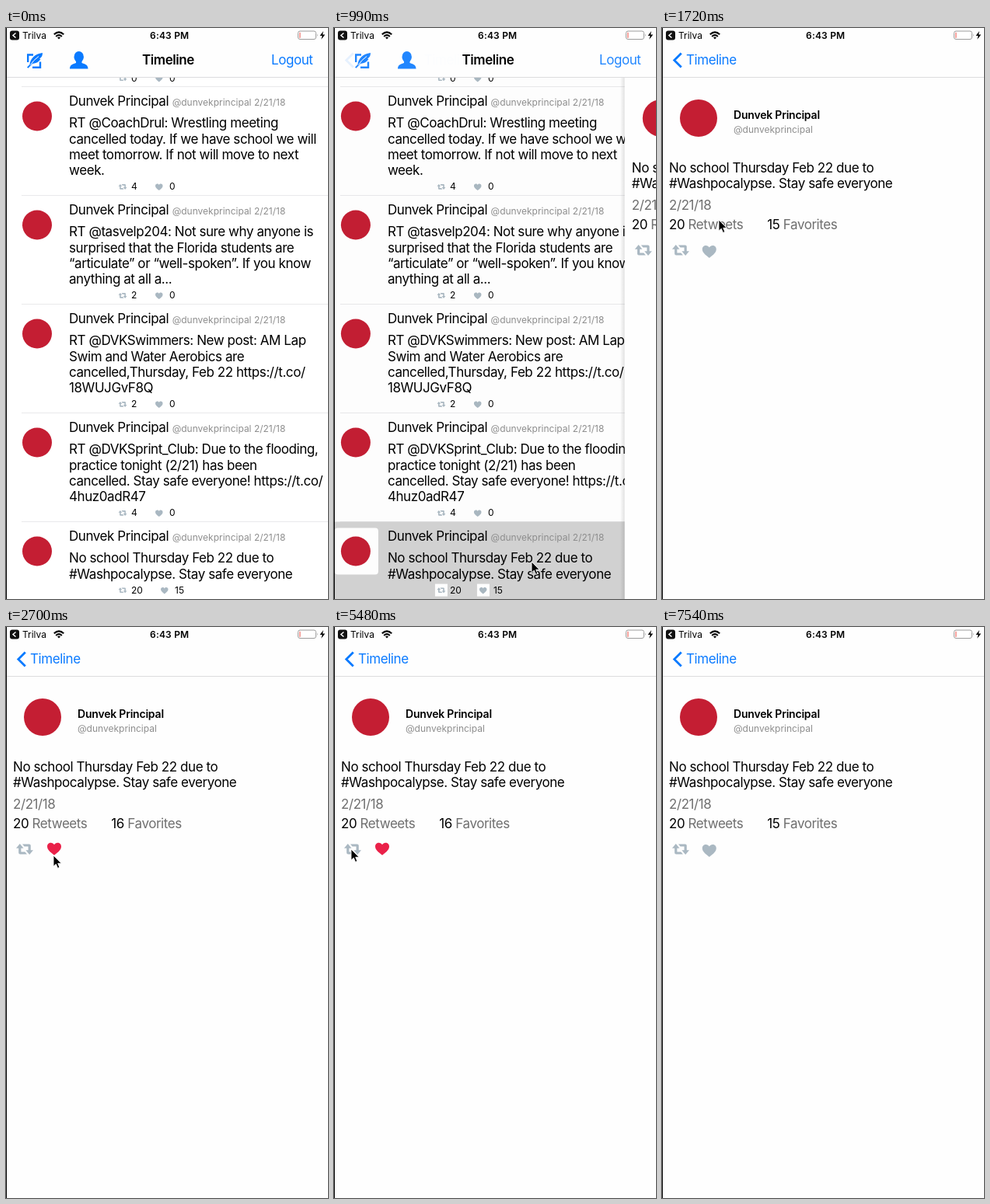
Animation of 414x735 px, one loop 7.64 s. Source, as an HTML page:

```html
<!DOCTYPE html>
<html lang="en">
<head>
<meta charset="utf-8">
<title>Timeline</title>
<style>
  html, body { margin: 0; width: 100%; height: 100%; overflow: hidden; background: #fff; }
  svg { display: block; width: 414px; height: 735px; }
  text { font: 400 17px Inter, sans-serif; letter-spacing: -.43px; font-feature-settings: "calt" 0; }
  .small { font-size: 12px; letter-spacing: 0; }
  .semi { font-weight: 600; }
  .name { font-size: 14px; font-weight: 600; letter-spacing: -.2px; }
  .clock { font-size: 12px; font-weight: 600; letter-spacing: .2px; }
  .muted { fill: #8e8e8e; }
  .gray { fill: #6f6f6f; }
  .blue { fill: #0a7aff; }
  .icon { fill: #aab8c2; }
</style>
</head>
<body>
<svg id="stage" viewBox="0 0 414 735" xmlns="http://www.w3.org/2000/svg"></svg>
<script>
const LOOP = 7640, WIDTH = 414;
const BLUE = '#0a7aff', BADGE = '#c41e33';
const NAME = 'Dunvek Principal', HANDLE = '@dunvekprincipal', DATE = '2/21/18';
const NEWS = ['No school Thursday Feb 22 due to', '#Washpocalypse. Stay safe everyone'];

const POSTS = [
  { lines: ['RT @CoachDrul: Wrestling meeting', 'cancelled today. If we have school we will',
            'meet tomorrow. If not will move to next', 'week.'], shares: 4, likes: 0 },
  { lines: ['RT @tasvelp204: Not sure why anyone is', 'surprised that the Florida students are',
            '“articulate” or “well-spoken”. If you know', 'anything at all a...'], shares: 2, likes: 0 },
  { lines: ['RT @DVKSwimmers: New post: AM Lap', 'Swim and Water Aerobics are',
            'cancelled,Thursday, Feb 22 https://t.co/', '18WUJGvF8Q'], shares: 2, likes: 0 },
  { lines: ['RT @DVKSprint_Club: Due to the flooding,', 'practice tonight (2/21) has been',
            'cancelled. Stay safe everyone! https://t.co/', '4huz0adR47'], shares: 4, likes: 0 },
  { lines: NEWS, shares: 20, likes: 15 }
];

// Pointer stops: time, x, y
const STOPS = [
  [150, 363, 580], [670, 254, 687],
  [1270, 254, 687], [1510, 75, 239],
  [1719, 75, 239], [1720, 73, 247], [1870, 46, 297],
  [2080, 46, 297], [2180, 60, 271], [2260, 66, 283], [2340, 61, 294],
  [3060, 61, 294], [3420, 22, 286],
  [5720, 22, 286], [6050, 60, 284],
  [6560, 60, 284], [6920, 348, 736]
];

const text = (x, y, s, cls = '', extra = '') => `<text x="${x}" y="${y}" class="${cls}" ${extra}>${s}</text>`;
const rect = (x, y, w, h, fill, extra = '') =>
  `<rect x="${x}" y="${y}" width="${w}" height="${h}" fill="${fill}" ${extra}/>`;
const place = (id, x, y, k = 1, extra = '') =>
  `<use href="#${id}" transform="translate(${x} ${y}) scale(${k})" ${extra}/>`;

function counts(y, shares, likes) {
  const heartX = shares > 9 ? 199 : 192;
  return place('share', 144.5, y - 7.3, .5, 'class="icon"') + text(161, y, shares, 'small') +
    place('heart', heartX, y - 7.6, .53, 'class="icon"') + text(heartX + 18, y, likes, 'small');
}

function post({ lines, shares, likes }, i) {
  const y = i * 140 + 75.5, end = y + 51.5 + lines.length * 20.3;
  const chosen = i === 4
    ? `<g id="chosen">${rect(0, y, WIDTH, 110, '#d3d3d3')}${rect(13, y + 8, 56, 60, '#fff', 'rx="4"')}
       ${rect(142, end - 12, 16, 16, '#fff')}${rect(196, end - 12, 16, 16, '#fff')}</g>`
    : '';
  return rect(20, y - .5, 394, 1, '#e9e9eb') + chosen +
    `<circle cx="40" cy="${y + 38}" r="19" fill="${BADGE}"/>` +
    `<text x="81" y="${y + 24.7}">${NAME}<tspan class="small muted" dx="4.5">${HANDLE} ${DATE}</tspan></text>` +
    lines.map((s, n) => text(81, y + 52.8 + n * 20.3, s)).join('') +
    counts(end, shares, likes);
}

const stage = document.getElementById('stage');
stage.innerHTML = `
<defs>
  <g id="share">
    <path id="hook" d="M0 5.7 4.8 0 9.6 5.7H6.4V10.4H11.4L14 13.6H5.2Q3.2 13.6 3.2 11.6V5.7Z"/>
    <use href="#hook" transform="translate(22 14) scale(-1)"/>
  </g>
  <path id="heart" d="M9 16C3 11.6 0 8.5 0 4.8 0 2 2.1 0 4.7 0 6.5 0 8.1 1 9 2.6 9.9 1 11.5 0 13.3 0 15.9 0 18 2 18 4.8 18 8.5 15 11.6 9 16Z"/>
  <linearGradient id="edge"><stop offset="0" stop-opacity="0"/><stop offset="1" stop-opacity=".12"/></linearGradient>
</defs>
${rect(0, 0, WIDTH, 735, '#fff')}
<g id="list">${counts(68.5, 0, 0)}${POSTS.map(post).join('')}</g>
${rect(0, 64, WIDTH, 671, '#000', 'id="dim"')}
<g id="detail">
  ${rect(-6, 64, 6, 671, 'url(#edge)', 'id="shade"')}
  ${rect(0, 64, WIDTH, 671, '#fefefe')}
  <circle cx="47" cy="116" r="24" fill="${BADGE}"/>
  ${text(92, 116.5, NAME, 'name')}
  ${text(92, 135.3, HANDLE, 'small muted')}
  ${NEWS.map((s, i) => text(9, 185.8 + i * 20.3, s)).join('')}
  ${text(9, 234, DATE, 'gray')}
  <text x="9" y="258.7"><tspan id="shares">20</tspan><tspan class="gray"> Retweets</tspan><tspan
    id="likes" dx="31">15</tspan><tspan class="gray"> Favorites</tspan></text>
  ${place('share', 13, 279, 1, 'id="shareIcon"')}
  <use id="heartIcon" href="#heart"/>
</g>
${rect(0, 0, WIDTH, 63, '#fefefe')}${rect(0, 63, WIDTH, 1, '#dcdcde')}
<g id="tools">
  <path d="M35 34.5H28.2V44M34 50.8H44V43.5" fill="none" stroke="${BLUE}" stroke-width="2.4"/>
  <path d="M30.500 47C31 40 37 33 47 32 47 36 45.500 38 43 39.500L44.500 40C42.500 43.500 39 45.500 34 46L28.500 51.800 27 50.500Z" fill="${BLUE}"/>
  <path d="M31.500 47.500Q35 41.500 42 36.500" fill="none" stroke="#fff" stroke-width="1"/>
  <ellipse cx="93.7" cy="37.2" rx="6.2" ry="7.2" fill="${BLUE}"/>
  <path d="M90 42H97.5V45C101 46.5 105.5 47 105.5 52.5H82C82 47 86.5 46.5 90 45Z" fill="${BLUE}"/>
  ${text(341, 47.2, 'Logout', 'blue')}
</g>
${text(175, 47.2, 'Timeline', 'semi', 'id="title"')}
<path id="chevron" d="M24.8 32.5 15.8 41.5 24.8 50.5" fill="none" stroke="${BLUE}" stroke-width="2.8"/>
${text(31, 47.2, 'Timeline', 'blue', 'id="back"')}
${rect(5, 3.5, 12, 12, '#111', 'rx="3"')}
<path d="M12.5 6.5 9 9.5 12.5 12.5" fill="none" stroke="#fff" stroke-width="1.5"/>
${text(21, 13.8, 'Trilva', 'small')}
<g fill="none" stroke="#000" stroke-width="2.1">
  <path d="M61.8 8.2Q68 2.4 74.2 8.2"/><path d="M64.2 10.9Q68 7.4 71.8 10.9"/>
</g>
<path d="M66 12.3Q68 10.7 70 12.3L68 14.4Z"/>
${text(185, 13.8, '6:43 PM', 'clock')}
${rect(375.5, 4, 23, 10.5, '#fff', 'rx="2.5" stroke="#9c9c9c"')}
${rect(377.3, 5.8, 1.2, 7, '#f0645c')}
<path d="M400 7.5Q401.8 9.3 400 11Z" fill="#9c9c9c"/>
<path d="M408 4 403.5 10H406.5L405.3 14.8 410.2 8.5H407.1Z"/>
${rect(0, 0, 1, 735, '#000')}
<path id="pointer" d="M0 0V14.2L3.3 11.2 5.5 16.4 7.9 15.4 5.7 10.3H10.2Z" stroke="#fff" stroke-width=".9"/>`;

const el = id => document.getElementById(id);
const set = (id, attrs) => { for (const k in attrs) el(id).setAttribute(k, attrs[k]); };
const lerp = (a, b, u) => a + (b - a) * u;

// Critically damped spring for the screen push
function push(t) {
  const x = Math.max(0, t - 965.5) * .0205;
  return x > 9 ? 1 : 1 - (1 + x) * Math.exp(-x);
}

function pointerAt(t) {
  const i = STOPS.findIndex(s => s[0] > t);
  if (i < 1) return null;
  const [t0, x0, y0] = STOPS[i - 1], [t1, x1, y1] = STOPS[i];
  const u = (t - t0) / (t1 - t0), e = u * u * (3 - 2 * u);
  return [lerp(x0, x1, e), lerp(y0, y1, e)];
}

function draw(t) {
  const p = push(t);
  const liked = t >= 2700 && t < 6380, shared = t >= 4350 && t < 5480;

  set('list', { transform: `translate(${-.3 * WIDTH * p} 0)` });
  set('chosen', { visibility: t >= 850 ? 'visible' : 'hidden' });
  set('dim', { opacity: .1 * p });
  set('detail', { transform: `translate(${WIDTH * (1 - p)} 0)`, visibility: p > 0 ? 'visible' : 'hidden' });
  set('shade', { opacity: 1 - p * .6 });

  set('tools', { opacity: 1 - p });
  set('title', { x: lerp(175, 67, p), opacity: 1 - p * p });
  set('back', { x: lerp(125, 31, p), opacity: p * p });
  set('chevron', { opacity: p });

  el('shares').textContent = shared ? 21 : 20;
  el('likes').textContent = liked ? 16 : 15;
  set('shareIcon', { fill: shared ? '#17bf63' : '#aab8c2' });
  set('heartIcon', {
    fill: liked ? '#ea2149' : '#aab8c2',
    transform: liked ? 'translate(53 277.7)' : 'translate(51.8 279.9)'
  });

  const at = pointerAt(t);
  set('pointer', at
    ? { transform: `translate(${at})`, visibility: 'visible' }
    : { visibility: 'hidden' });
}

const start = performance.now();
function tick() {
  draw((performance.now() - start) % LOOP);
  requestAnimationFrame(tick);
}
tick();
</script>
</body>
</html>
```
